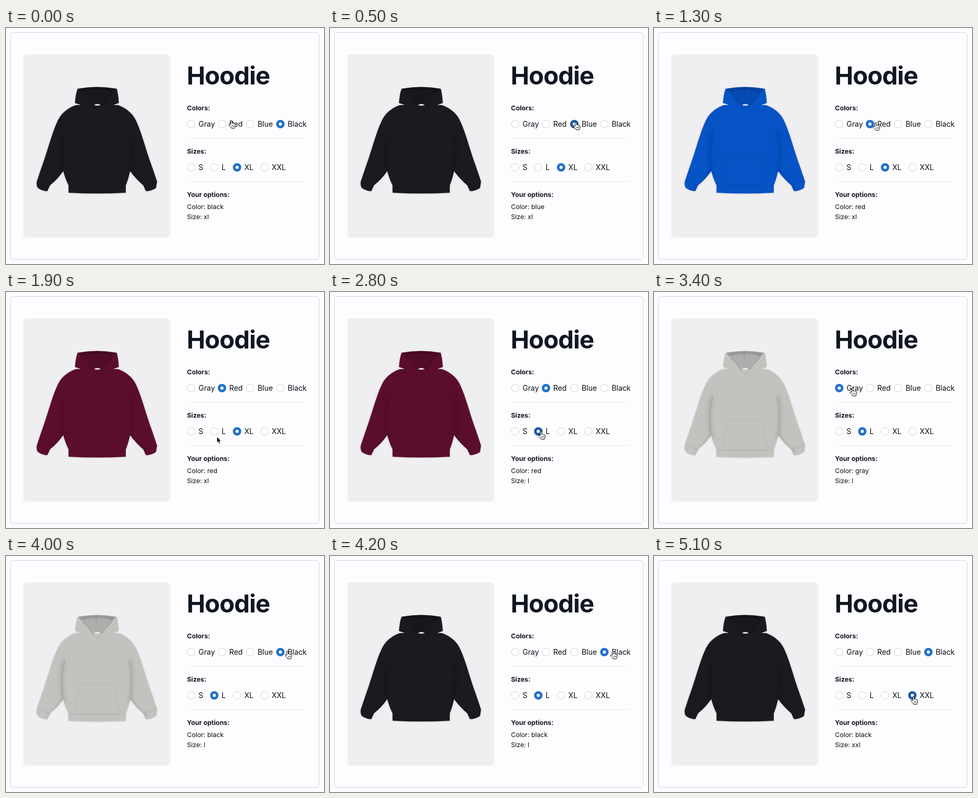
Animation of 600x447 px, one loop 5200 ms. Source, as an HTML page:

```html
<!DOCTYPE html>
<html lang="en">
<head>
<meta charset="utf-8">
<title>Hoodie options</title>
<style>
  html, body { margin: 0; width: 100%; height: 100%; overflow: hidden; background: #fcfcfe; }
  svg { display: block; width: 600px; height: 447px; font: 13.85px Inter, sans-serif; fill: #0b0d12; }
  .title { font-size: 46.8px; font-weight: 700; letter-spacing: -.021em; fill: #111722; }
  .head { font-size: 12.35px; font-weight: 700; fill: #111722; }
  .small { font-size: 12.25px; }
  .fold { fill: none; stroke: #000; stroke-linecap: round; }
</style>
</head>
<body>
<svg viewBox="0 0 600 447">
  <defs>
    <filter id="soft" x="-30%" y="-30%" width="160%" height="160%"><feGaussianBlur stdDeviation="3"/></filter>
    <clipPath id="inside"><use href="#shape"/></clipPath>
  </defs>
  <rect x="8.5" y="8.5" width="582.5" height="430" rx="5" fill="#fdfdff" stroke="#c8d8e1"/>
  <rect x="32.5" y="50" width="277.5" height="347" rx="6" fill="#efeef0"/>

  <g id="hoodie">
    <path id="shape" style="filter:drop-shadow(0 0 1.5px #0003)" d="M132 146C118 151 107 159 100 171C88 193 79 232 67 264L58 291Q57 299 60 303Q69 309 78 309L83 298Q97 287 108 271Q112 286 118 298V312Q172 315 226 312V298Q231 286 234 271Q246 287 259 298L264 309Q274 309 283 303L285 291L276 264C264 232 255 193 243 171C236 159 225 151 211 146Z"/>
    <g clip-path="url(#inside)">
      <g class="fold" stroke-width="7" opacity=".1" filter="url(#soft)">
        <path d="M108 200Q102 235 108 275M235 200Q241 235 234 275M82 305Q98 290 108 270M262 305Q247 290 235 270"/>
      </g>
      <path class="fold" opacity=".12" d="M111 195Q102 235 108 272M232 195Q241 235 234 272M118 299Q172 302 226 299M61 290Q70 295 83 298M282 290Q272 295 259 298"/>
      <path class="fold" opacity=".07" d="M139 243H204Q209 268 213 292Q211 298 204 298H138Q130 298 130 291Q134 267 139 243"/>
    </g>
    <path d="M130 142Q131 126 135 115Q172 108 209 115Q212 126 213 142Q199 148 183 152L172 156L161 152Q145 148 130 142Z"/>
    <path fill="#000" opacity=".1" d="M137 115Q172 109 207 115Q204 121 198 127Q188 137 181 147Q172 144 163 147Q157 137 146 127Q139 121 137 115Z"/>
    <path fill="#000" opacity=".12" d="M137 115Q172 109 207 115Q204 119 199 122Q172 113 145 122Q140 119 137 115Z"/>
    <path class="fold" opacity=".2" d="M170 113V127M145 125Q157 137 163 147L172 156L181 147Q187 137 199 125"/>
    <path fill="#eeeeef" d="M166 146Q172 142 179 146Q172 148 166 146Z"/>
  </g>

  <text class="title" x="341" y="106.5">Hoodie</text>
  <text class="head" x="341.5" y="156">Colors:</text>
  <text class="head" x="341.5" y="237.5">Sizes:</text>
  <text class="head" x="341.5" y="319.5">Your options:</text>
  <path d="M341.5 208.5H566.5M341.5 291H566.5" stroke="#e8ecf1"/>
  <g id="radios"></g>
  <text class="small" id="colorText" x="341.5" y="343"></text>
  <text class="small" id="sizeText" x="341.5" y="362"></text>

  <g id="hand" fill="#fff" stroke="#000" stroke-linejoin="round">
    <path d="M-1.2 8V1.2A1.3 1.3 0 0 1 1.4 1.2V5.5Q2.8 4.7 3.6 5.8Q5.1 5.1 5.7 6.4Q7.6 6 7.8 7.8V10.5C7.8 12.4 6.6 12.8 6.5 14.8H.3C0 12.8-2.8 11.2-4.3 8.7C-5 7.1-3.2 6.4-2.3 7.3Z"/>
    <path d="M1.4 9V12M3.4 9V12M5.4 9V12" stroke-width=".7"/>
  </g>
  <path id="arrow" fill="#000" stroke="#fff" stroke-width=".8" d="M0 0V11.5L2.6 9.2L4.4 13.4L6.4 12.5L4.6 8.5H8Z"/>
</svg>
<script>
const LOOP = 5200, STEP = 100, IMAGE_DELAY = 200;
const rows = {
  color: { y: 182, items: { Gray: 349.5, Red: 407.5, Blue: 461, Black: 517.7 } },
  size: { y: 264, items: { S: 349.5, L: 393, XL: 436, XXL: 487.5 } }
};
const dyes = { Gray: '#c3c2bf', Red: '#5b0e2c', Blue: '#0653c6', Black: '#1b1a1e' };
const picks = {
  color: [[0, 'Black'], [400, 'Blue'], [1200, 'Red'], [3200, 'Gray'], [4000, 'Black']],
  size: [[0, 'XL'], [2300, 'L'], [5000, 'XXL']]
};
// Pointer path: time, x, y
const path = [
  [0, 425, 175], [100, 515, 254], [200, 464, 178], [700, 464, 178],
  [1000, 425, 180], [1300, 418, 179], [1400, 418, 179], [1600, 428, 232],
  [1900, 398, 274], [2200, 398, 264], [2900, 398, 264], [3200, 374.5, 182],
  [3400, 374.5, 182], [3700, 485, 185], [4000, 531, 180], [4300, 535.5, 180],
  [4500, 490, 215], [4700, 395, 264], [5000, 489.5, 266], [5200, 489.5, 266]
];

const $ = id => document.getElementById(id);
const radios = [];
function add(tag, attrs, text = '') {
  const el = document.createElementNS('http://www.w3.org/2000/svg', tag);
  for (const key in attrs) el.setAttribute(key, attrs[key]);
  el.textContent = text;
  return $('radios').appendChild(el);
}
for (const group in rows) {
  const { y, items } = rows[group];
  for (const name in items) {
    const x = items[name];
    radios.push({ group, name, x, y, ring: add('circle', { cx: x, cy: y }) });
    add('text', { x: x + 13.8, y: y + 5 }, name);
  }
}

const pick = (group, t) => picks[group].filter(p => p[0] <= t).pop()[1];

function pointer(t) {
  const i = path.findIndex(p => p[0] > t);
  const [t0, x0, y0] = path[i - 1], [t1, x1, y1] = path[i];
  const k = (t - t0) / (t1 - t0);
  return [x0 + (x1 - x0) * k, y0 + (y1 - y0) * k];
}

function draw(now) {
  const t = Math.floor(now % LOOP / STEP) * STEP;
  const chosen = { color: pick('color', t), size: pick('size', t) };
  const [px, py] = pointer(t);

  for (const { group, name, x, y, ring } of radios) {
    const on = chosen[group] === name;
    const hover = Math.hypot(px - x, py - y) < 8;
    ring.setAttribute('r', on ? 5.5 : 7.2);
    ring.setAttribute('fill', '#fff');
    ring.setAttribute('stroke', on ? (hover ? '#1b5ca6' : '#2272c8') : '#dde3ea');
    ring.setAttribute('stroke-width', on ? 5 : 1.5);
  }
  $('hoodie').setAttribute('fill', dyes[pick('color', Math.max(0, t - IMAGE_DELAY))]);
  $('colorText').textContent = 'Color: ' + chosen.color.toLowerCase();
  $('sizeText').textContent = 'Size: ' + chosen.size.toLowerCase();

  const overRow = Object.values(rows).some(row => Math.abs(py - row.y) < 10);
  for (const id of ['hand', 'arrow']) {
    $(id).setAttribute('transform', `translate(${px} ${py})`);
    $(id).setAttribute('visibility', (id === 'hand') === overRow ? 'visible' : 'hidden');
  }
  requestAnimationFrame(draw);
}
draw(performance.now());
</script>
</body>
</html>
```
